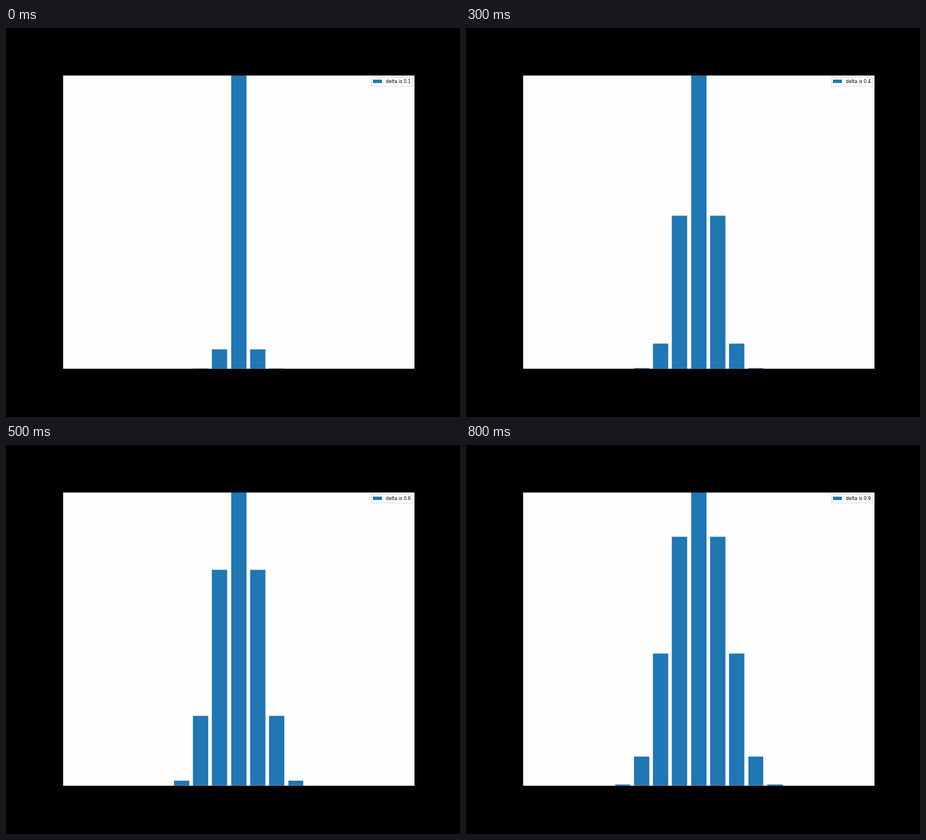
Recreate the animation shown at these times as a matplotlib script. Size 808 by 693 pixels, loop 0.9 s.

```python
import matplotlib.pyplot as plt
import numpy as np
from matplotlib.animation import FuncAnimation

W, H, DPI = 808, 693, 64
BLUE = "#1f77b4"
STEPS = 9
REACH = 8

plt.rcParams.update({"font.family": "DejaVu Sans", "font.size": 9})
fig = plt.figure(figsize=(W / DPI, H / DPI), dpi=DPI, facecolor="black")
ax = fig.add_axes([.125, 86.2 / H, .775, .755], facecolor="#fefefe")

# Bars sit on a whole-unit grid that spans the axes
X0, SPAN = 126, 781.2
PITCH = SPAN / (1.1 * (2 * REACH + .8))
MID = X0 + SPAN / 2
slots = np.arange(-REACH, REACH + 1)
left = np.round(MID + PITCH * (slots - .4))
right = np.round(MID + PITCH * (slots + .4))

bars = ax.bar(left, np.zeros(len(slots)), right - left, align="edge",
              color=BLUE, snap=False, label="delta is 0.1")
ax.set_xlim(X0, X0 + SPAN)
ax.set_ylim(0, 1)
ax.set_xticks([])
ax.set_yticks([])
for spine in ax.spines.values():
    spine.set_linewidth(.72)

legend = ax.legend(loc="upper right")
label = legend.get_texts()[0]


def heights(delta):
    """Bell exp(-rate * n**power) that widens and flattens as delta grows."""
    u = 10 * delta - 5
    rate = np.exp(np.polyval([-.00095, .00167, .0431, -.3767, -.844], u))
    power = np.polyval([.00096, -.0029, -.032, .1554, 2.1], u)
    n = np.abs(slots).astype(float)
    return np.exp(-rate * n ** (power + .13 * np.maximum(n - 2, 0)))


def draw(step):
    delta = (step + 1) / 10
    for bar, h in zip(bars, heights(delta)):
        bar.set_height(h)
    label.set_text(f"delta is {delta:.1f}")
    return [*bars, legend]


anim = FuncAnimation(fig, draw, frames=STEPS, interval=100,
                     repeat=True, repeat_delay=0, blit=False)
plt.show()
```
